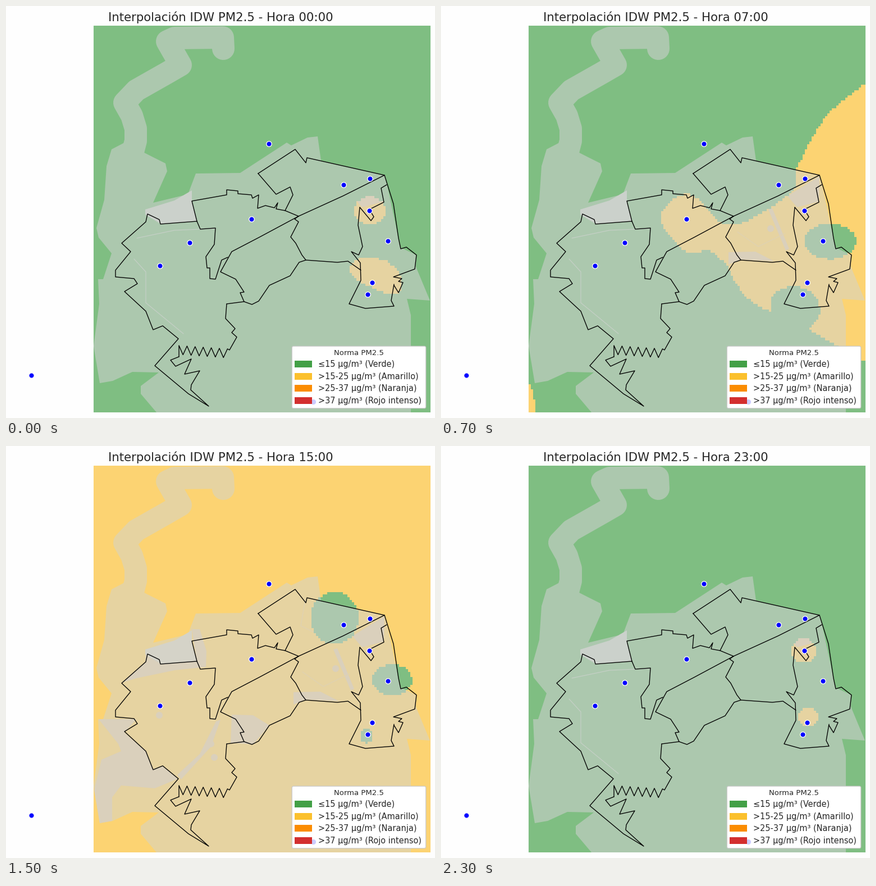
A matplotlib script for the animation above (2400 ms loop, 764 px wide and 733 px high).

```python
import numpy as np
import matplotlib.pyplot as plt
from matplotlib.animation import FuncAnimation
from matplotlib.patches import Circle, FancyBboxPatch, Polygon, Rectangle
from matplotlib.path import Path

W, H, DPI = 764, 733, 64
LEFT, TOP, RIGHT, BOTTOM = 156, 35, 756, 723
N = 150  # interpolation cells per side
PT = 72 / DPI

plt.rcParams["font.family"] = "DejaVu Sans"
fig = plt.figure(figsize=(W / DPI, H / DPI), dpi=DPI, facecolor="#fefefe")
ax = fig.add_axes([0, 0, 1, 1])
ax.set(xlim=(0, W), ylim=(H, 0))
ax.axis("off")


def pts(flat):
    return np.reshape(flat, (-1, 2)).astype(float)


def area(flat, color, z):
    return ax.add_patch(Polygon(pts(flat), fc=color, ec="none", zorder=z))


def line(flat, color="black", width=1.35, z=5):
    return ax.plot(*pts(flat).T, color=color, lw=width * PT, zorder=z,
                   solid_joinstyle="round", solid_capstyle="round")[0]


def text(x, y, s, px, **kw):
    return ax.text(x, y, s, fontsize=px * PT, color="#262626", zorder=12, **kw)


# --- grey zones -----------------------------------------------------------
river = [387, 76, 386, 56, 300, 57, 287, 63, 311, 105, 285, 120, 232, 150,
         211, 172, 224, 195, 231, 218, 231, 240, 222, 275]
body = [260, 268, 284, 280, 287, 294, 262, 350, 324, 335, 338, 298, 417, 297,
        500, 243, 508, 248, 537, 234, 555, 232, 561, 275, 675, 301, 699, 413,
        703, 430, 731, 443, 730, 464, 755, 524, 714, 521, 721, 550, 721, 723,
        268, 723, 240, 690, 240, 676, 272, 652, 225, 651, 190, 667, 167, 671,
        156, 605, 166, 530, 164, 486, 173, 486, 188, 440, 165, 412, 161, 395,
        175, 345, 179, 285, 188, 255, 211, 243]
core = [248, 362, 300, 346, 331, 328, 331, 350, 340, 383, 276, 388, 248, 371]


def land(ground, zone, middle, z):
    return [ax.add_patch(Rectangle((LEFT, TOP), RIGHT - LEFT, BOTTOM - TOP,
                                   fc=ground, ec="none", zorder=z)),
            line(river, zone, 40, z + 0.1), area(body, zone, z + 0.1),
            area(core, middle, z + 0.3)]


land("#7fbe82", "#acc8ae", "#cbd1cb", 1)
line([233, 413, 300, 399, 372, 396], "#c6d0c7", 1.2, 1.4)
line([228, 450, 249, 473, 249, 528, 316, 583], "#c6d0c7", 1.2, 1.4)

# moderate level: shown only inside the current interpolation mask
DOUBLE = "#dad0bc"
warm = land("#fcd372", "#e6d3a1", "#d5d3c8", 2)


def overlap(*flat):
    warm.append(area(flat, DOUBLE, 2.2))


overlap(165, 486, 232, 486, 211, 510, 249, 543, 262, 575, 279, 570, 306, 592,
        265, 609, 205, 604, 189, 625, 189, 667, 167, 671, 157, 612, 170, 558,
        205, 543, 200, 530)
overlap(206, 421, 248, 385, 249, 371, 340, 383, 331, 326, 345, 326, 357, 365,
        356, 393, 300, 399, 233, 413)
overlap(402, 478, 440, 479, 469, 497, 440, 531, 400, 528)
overlap(617, 338, 674, 303, 673, 348, 634, 358)
overlap(512, 438, 560, 437, 593, 454, 534, 451, 512, 460)
overlap(583, 362, 590, 360, 620, 432, 614, 435)
overlap(374, 490, 382, 487, 365, 535, 312, 593, 305, 585, 345, 548)
for x, y in [(273, 479), (371, 554), (587, 396), (365, 530)]:
    warm.append(ax.add_patch(Circle((x, y), 6, fc=DOUBLE, zorder=2.2)))
warm.append(line([533, 273, 525, 320, 583, 348], "#e0d2b0", 1.5, 2.2))
warm.append(line([528, 402, 565, 428, 612, 405], "#e0d2b0", 1.5, 2.2))

# --- district borders -----------------------------------------------------
line([449, 298, 515, 255, 534, 279, 536, 270, 674, 301, 600, 338, 521, 374,
      497, 364, 511, 336, 506, 322, 481, 335, 468, 320, 449, 298])
line([340, 383, 331, 347, 393, 336, 393, 327, 413, 329, 413, 334, 437, 336,
      439, 342, 450, 336, 448, 360, 462, 355, 478, 359, 484, 350, 481, 361,
      497, 364])
line([340, 383, 346, 397, 373, 395, 371, 424, 356, 446, 358, 466, 363, 466,
      363, 485, 373, 486, 384, 452, 395, 447])
line([521, 374, 450, 412, 402, 437, 382, 473, 409, 486, 424, 509, 417, 510,
      424, 526])
line([393, 530, 424, 526, 438, 531, 450, 525, 469, 497, 506, 480, 522, 456,
      534, 452, 590, 456, 609, 454, 632, 470])
line([521, 374, 514, 379, 521, 384, 507, 411, 516, 422, 527, 443, 534, 452])
line([678, 318, 668, 324, 673, 349, 647, 362, 655, 375, 650, 382, 630, 358,
      627, 390, 635, 428, 628, 443, 615, 437, 631, 457, 632, 488, 611, 530,
      640, 538, 691, 534, 686, 524, 691, 495])
line([674, 301, 690, 352, 699, 413, 703, 432, 713, 429, 731, 443, 728, 468,
      690, 482, 705, 485, 699, 490, 707, 492, 699, 510, 691, 497])
line([340, 383, 275, 388, 273, 380, 252, 370, 249, 384, 206, 422, 222, 437,
      195, 470, 195, 482, 228, 485, 234, 494, 211, 508, 249, 543, 262, 576,
      279, 569, 307, 592, 265, 640, 325, 690, 361, 712, 329, 683, 330, 674,
      345, 649, 318, 655, 330, 628, 302, 641, 293, 630, 308, 624])
k = np.arange(13)
teeth = np.column_stack([308 + 7.2 * k, 604 + 16 * (k % 2) + 0.5 * k])
line([308, 624, *teeth.ravel(), 398, 612, 411, 589, 402, 581, 408, 574,
      391, 556, 393, 530])

# --- stations -------------------------------------------------------------
stations = pts([45, 656.5, 273.5, 461.5, 326.5, 420.5, 436.5, 379, 467.5, 245,
                600.5, 318, 648, 306.5, 646.5, 364, 680, 417.5, 652, 492,
                644, 513])
ax.plot(*stations.T, "o", ms=9.4 * PT, mfc="blue", mec="white",
        mew=1.3 * PT, zorder=6)

# --- title and legend -----------------------------------------------------
title = text(382.3, 27, "", 21.3, ha="center")
ax.add_patch(FancyBboxPatch((512, 608), 233, 105, zorder=10,
                            boxstyle="round,pad=2.7,rounding_size=2.7",
                            fc="white", ec="#cccccc", lw=1.3 * PT))
ax.add_patch(Circle((547.5, 704.5), 4.6, fc="#ccccff", ec="none", zorder=10.5))
text(628.5, 621, "Norma PM2.5", 13.2, ha="center")
legend = {"≤15 µg/m³ (Verde)": "#43a047",
          ">15-25 µg/m³ (Amarillo)": "#fbc02d",
          ">25-37 µg/m³ (Naranja)": "#fb8c00",
          ">37 µg/m³ (Rojo intenso)": "#d32f2f"}
for i, (label, color) in enumerate(legend.items()):
    y = 631 + 21.6 * i
    ax.add_patch(Rectangle((514, y), 31, 12, fc=color, ec="none", zorder=11))
    text(556, y + 11.3, label, 14.5)

# --- interpolated level per hour ------------------------------------------
dx, dy = (RIGHT - LEFT) / N, (BOTTOM - TOP) / N
gx, gy = np.meshgrid(LEFT + dx * (np.arange(N) + 0.5),
                     TOP + dy * (np.arange(N) + 0.5))
cells = np.column_stack([gx.ravel(), gy.ravel()])
REACH = 30


def oval(cx, cy, rx, ry):
    """Level around one station, positive inside."""
    x, y = cells.T
    return (1 - np.hypot((x - cx) / rx, (y - cy) / ry)) * min(rx, ry)


def smooth(p, steps=6):
    """Closed Catmull-Rom curve."""
    a, c, d = (np.roll(p, s, axis=0) for s in (1, -1, -2))
    t = (np.arange(steps) / steps)[None, :, None]
    a, b, c, d = (q[:, None] for q in (a, p, c, d))
    curve = (2 * b + (c - a) * t + (2 * a - 5 * b + 4 * c - d) * t**2
             + (3 * b - a - 3 * c + d) * t**3) / 2
    return curve.reshape(-1, 2)


def blob(*flat):
    """Signed distance to a smooth outline, positive inside."""
    p = smooth(pts(flat))
    dist = np.full(len(cells), np.inf)
    for a, b in zip(p, np.roll(p, -1, axis=0)):
        d, rel = b - a, cells - a
        t = np.clip(rel @ d / (d @ d), 0, 1)
        dist = np.minimum(dist, np.hypot(*(rel - t[:, None] * d).T))
    return np.where(Path(p).contains_points(cells), dist, -dist)


def level(high=(), low=()):
    f = np.max(high, axis=0) if len(high) else np.full(len(cells), REACH)
    for hole in low:
        f = np.minimum(f, -hole)
    return np.clip(f, -REACH, REACH)


night = blob(612, 468, 630, 449, 675, 453, 703, 480, 702, 506, 686, 513,
             650, 500, 624, 486)
dawn = blob(810, 140, 756, 163, 690, 215, 633, 300, 622, 335, 524, 398,
            470, 343, 428, 333, 384, 372, 400, 414, 440, 446, 512, 445,
            544, 470, 620, 490, 680, 516, 756, 544, 810, 560)
morning = blob(810, 95, 756, 122, 680, 188, 632, 285, 622, 332, 508, 388,
               440, 337, 396, 375, 436, 430, 485, 432, 510, 505, 550, 548,
               602, 563, 610, 520, 636, 501, 664, 525, 632, 580, 660, 602,
               756, 654, 810, 665)
corner = blob(100, 500, 156, 620, 184, 690, 190, 800, 100, 800)
dusk = blob(690, 328, 720, 350, 680, 380, 640, 420, 680, 455, 740, 468,
            775, 490, 756, 515, 720, 533, 648, 502, 588, 487, 572, 450,
            605, 362, 640, 333)
dusk_corner = blob(100, 490, 156, 548, 225, 618, 276, 730, 282, 800, 100, 800)
east, south = oval(690, 416, 42, 32), oval(642, 516, 14, 14)

levels = {
    0: level([oval(648, 364, 28, 25), night]),
    4: level([dawn], [oval(690, 420, 38, 28)]),
    9: level([morning, corner, oval(328, 418, 8, 8)],
             [oval(696, 418, 52, 34)]),
    12: level(low=[oval(682, 418, 18, 16), oval(641, 514, 5, 7)]),
    16: level(low=[oval(585, 306, 53, 57), east, south]),
    18: level(low=[oval(590, 310, 34, 37), east, south]),
    19: level([oval(432, 388, 76, 78), oval(339, 412, 28, 26), dusk,
               dusk_corner]),
    23: level([oval(646, 364, 22, 21), oval(654, 482, 18, 17)]),
}


def mask_path(hour):
    """Outline of all cells above the first threshold, one box per run."""
    a = max(key for key in levels if key <= hour)
    b = min(key for key in levels if key >= hour)
    t = (hour - a) / (b - a) if b > a else 0
    on = ((1 - t) * levels[a] + t * levels[b] > 0).reshape(N, N)
    verts = []
    for j, row in enumerate(on):
        edges = np.flatnonzero(np.diff(np.r_[0, row.astype(int), 0]))
        y0, y1 = TOP + dy * j, TOP + dy * (j + 1)
        for x0, x1 in LEFT + dx * edges.reshape(-1, 2):
            verts += [(x0, y0), (x1, y0), (x1, y1), (x0, y1), (x0, y0)]
    box = [Path.MOVETO] + [Path.LINETO] * 3 + [Path.CLOSEPOLY]
    return Path(verts, box * (len(verts) // 5))


masks = [mask_path(h) for h in range(24)]


def draw(hour):
    title.set_text(f"Interpolación IDW PM2.5 - Hora {hour:02d}:00")
    for artist in warm:
        artist.set_clip_path(masks[hour], ax.transData)
    return [title, *warm]


anim = FuncAnimation(fig, draw, frames=24, interval=100, repeat=True,
                     repeat_delay=0, init_func=lambda: draw(0))
plt.show()
```
